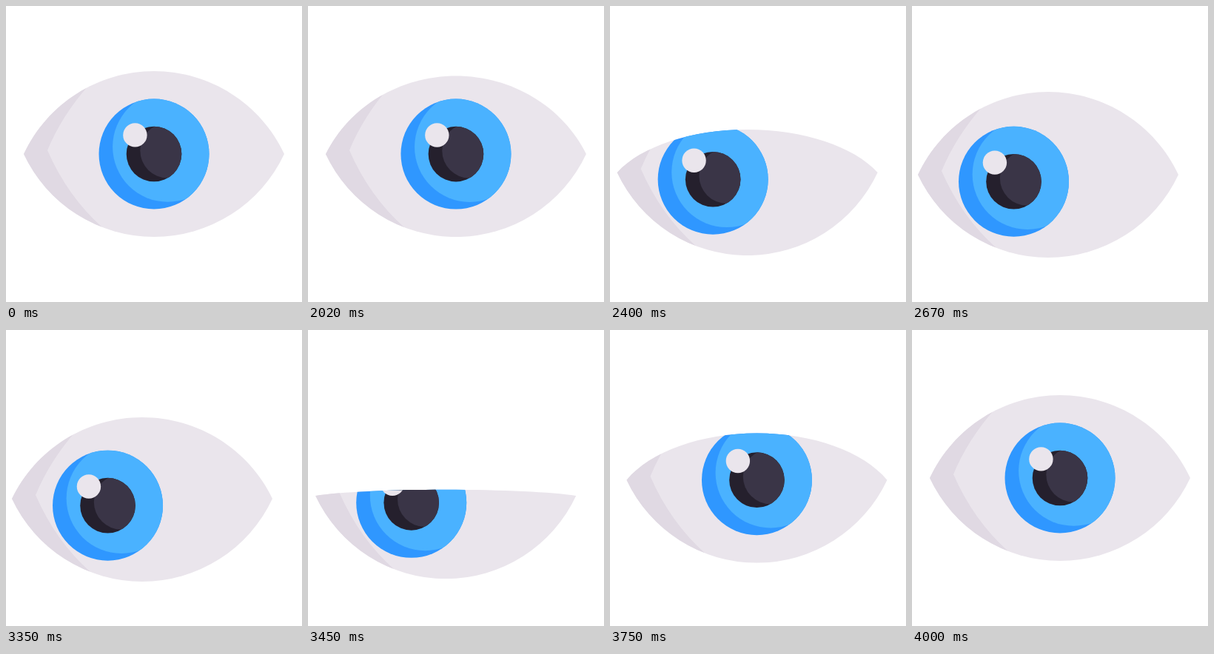
Recreate the animation shown at these times as an HTML page. Size 400 by 400 pixels, loop 4020 ms.

```html
<!DOCTYPE html>
<html>
<head>
<meta charset="utf-8">
<style>
html, body { margin: 0; width: 100%; height: 100%; overflow: hidden; background: #fff; }
svg { display: block; width: 100%; height: 100%; }
</style>
</head>
<body>
<svg viewBox="0 0 400 400">
  <defs>
    <clipPath id="opening"><path id="lids"/></clipPath>
    <clipPath id="irisClip"><circle r="74.5"/></clipPath>
    <clipPath id="pupilClip"><circle r="37.3"/></clipPath>
  </defs>
  <g id="eye">
    <g clip-path="url(#opening)">
      <rect x="-190" y="-130" width="380" height="260" fill="#eae5ec"/>
      <path fill="#e0d9e3" d="M-89-92Q-125-51-144-5Q-117 57-70 99L-190 130V-130Z"/>
      <g id="iris">
        <circle r="74.5" fill="#2f97ff"/>
        <circle cx="18.6" cy="-9.7" r="74.5" fill="#4ab2ff" clip-path="url(#irisClip)"/>
        <circle r="37.3" fill="#25202d"/>
        <circle cx="18.6" cy="-4.7" r="37.3" fill="#3a3547" clip-path="url(#pupilClip)"/>
        <circle cx="-25.6" cy="-25.6" r="16.2" fill="#eae5ec"/>
      </g>
    </g>
  </g>
</svg>
<script>
const LOOP = 4020, LOOK = 1997, RETURN = 3338;
const CLOSE = 233, OPEN = 410, SHIFT = 667;
const OPEN_RISE = 112, CLOSED_RISE = -105;
const [eye, iris, lids] = ['eye', 'iris', 'lids'].map(id => document.getElementById(id));

// cubic-bezier(x1, 0, x2, 1)
function ease(t, x1, x2) {
  if (t <= 0) return 0;
  if (t >= 1) return 1;
  let lo = 0, hi = 1;
  for (let i = 0; i < 24; i++) {
    const s = (lo + hi) / 2, r = 1 - s;
    if (3 * r * r * s * x1 + 3 * r * s * s * x2 + s * s * s < t) lo = s; else hi = s;
  }
  return lo * lo * (3 - 2 * lo);
}

const shift = t => ease(t / SHIFT, 1 / 3, 0.16);

const closure = t => t < CLOSE
  ? ease(t / CLOSE, 1 / 3, 2 / 3)
  : 1 - ease((t - CLOSE) / OPEN, 1 / 6, 1 / 6);

// The upper lid is an arc flattened and flipped by its rise; the corners lift slightly when shut.
function lidPath(shut) {
  const rise = OPEN_RISE + (CLOSED_RISE - OPEN_RISE) * shut;
  const q = shut ** 4, y = -3 * q;
  const outer = 176 + 1.4 * q, inner = 176 - 1.5 * q;
  const hx = inner - 32, hy = y - 0.61 * rise;
  return `M${-outer} ${y}A194.3 194.3 0 0 0 ${outer} ${y}L${inner} ${y}` +
    `C${hx} ${hy} 75.4 ${-rise} 0 ${-rise}S${-hx} ${hy} ${-inner} ${y}Z`;
}

function draw(now) {
  const t = now % LOOP;
  const away = shift(t - LOOK) - shift(t - RETURN);
  const shut = closure(t - (t < RETURN ? LOOK : RETURN));
  // The gaze jumps while the eye is shut.
  const aside = t >= LOOK + CLOSE && t < RETURN + CLOSE;
  eye.setAttribute('transform', `translate(${200 - 16 * away} ${200 + 28 * away})`);
  iris.setAttribute('transform', aside ? 'translate(-46.5 9.2)' : '');
  lids.setAttribute('d', lidPath(shut));
  requestAnimationFrame(draw);
}
requestAnimationFrame(draw);
</script>
</body>
</html>
```
